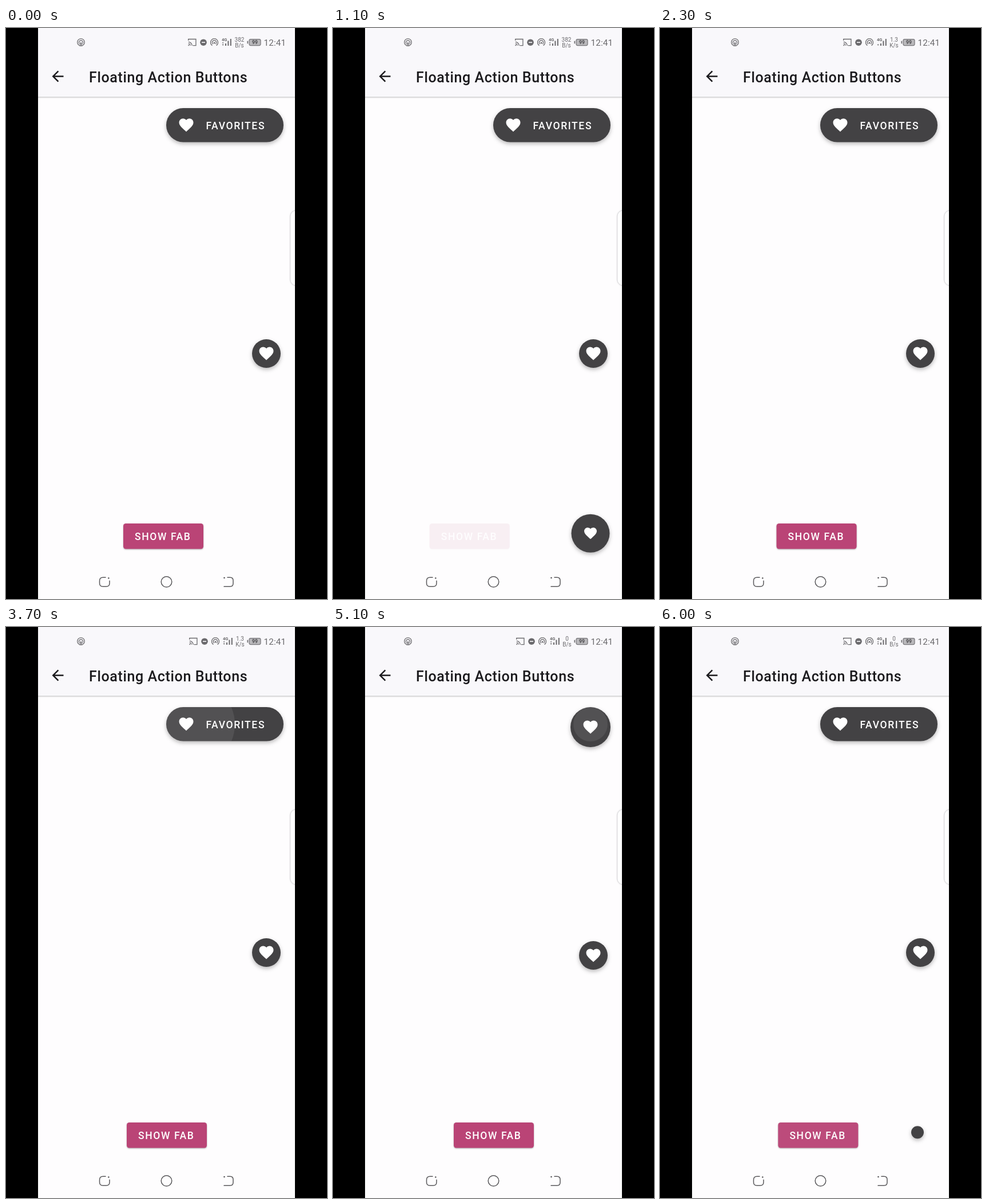
These frames come from a looping animation (561 px wide and 998 px high, 6100 ms). An HTML page:

```html
<!DOCTYPE html>
<html lang="en">
<head>
<meta charset="utf-8">
<title>Floating Action Buttons</title>
<style>
html, body { margin: 0; width: 100%; height: 100%; overflow: hidden; background: #000; }
svg { display: block; }
text { font-family: Roboto, Arial, sans-serif; }
.label { font-size: 17.5px; font-weight: 500; letter-spacing: 1.62px; fill: #fff; }
.bar { fill: #f9f8fb; filter: drop-shadow(0 1px 1.2px rgba(0,0,0,.28)); }
.raised { filter: drop-shadow(0 3px 3.5px rgba(0,0,0,.27)); }
.low { filter: drop-shadow(0 1.5px 1.3px rgba(0,0,0,.3)); }
.dark { fill: #434244; }
.line { fill: none; stroke: #6b6a6d; stroke-width: 1.3; }
.nav { fill: none; stroke: #59585b; stroke-width: 1.5; stroke-linecap: round; }
.status { fill: #6b6a6d; }
.small { font-size: 10px; text-anchor: middle; }
</style>
</head>
<body>
<svg width="561" height="998" viewBox="0 0 561 998">
  <defs>
    <path id="heart" fill="#fff" transform="scale(1.247) translate(-12 -12.2)" d="M12 21.35l-1.45-1.32C5.4 15.36 2 12.28 2 8.5 2 5.42 4.42 3 7.5 3c1.74 0 3.41.81 4.5 2.09C13.09 3.81 14.76 3 16.5 3 19.58 3 22 5.42 22 8.5c0 3.78-3.4 6.86-8.55 11.54L12 21.35z"/>
    <rect id="pill" y="140"/>
    <clipPath id="pillClip"><use href="#pill"/></clipPath>
  </defs>

  <rect x="56" width="449" height="998" fill="#fefdfe"/>
  <rect class="bar" x="50" y="-10" width="461" height="130.3"/>
  <path fill="#1b1a1d" transform="translate(75.5 69.5) scale(1.25)" d="M20 11H7.83l5.59-5.59L12 4l-8 8 8 8 1.41-1.41L7.83 13H20v-2z"/>
  <text x="145" y="95" font-size="25" font-weight="500" letter-spacing=".63" fill="#1b1a1d">Floating Action Buttons</text>

  <!-- status bar -->
  <g class="line">
    <path d="M128 30.4a6.3 6.3 0 1 1 6 0M128.6 27.6a3.5 3.5 0 1 1 4.8 0M131 25.5l-2 5.5h4z"/>
  </g>
  <g id="icons" class="status">
    <path class="line" d="M318.7 22v-2.5h13.2v11.2h-5.4M318.7 24.3a6.4 6.4 0 0 1 6.4 6.4M318.7 27.4a3.3 3.3 0 0 1 3.3 3.3"/>
    <circle cx="319.2" cy="30.3" r="1"/>
    <circle cx="345" cy="25.2" r="5.8"/>
    <path d="M342 25.2h6" stroke="#f9f8fb" stroke-width="1.6"/>
    <path class="line" d="M360.4 30.6a6.5 6.5 0 1 1 7.2 0M361.7 28a3.6 3.6 0 1 1 4.6 0"/>
    <circle cx="364" cy="26" r="1.5"/>
    <text x="377" y="22.5" font-size="7.5" font-weight="700">4G</text>
    <path d="M383 27h2v4h-2zM387.4 22.5h2v8.500h-2zM391.800 19h2v12h-2z"/>
    <path id="up" d="M377.600 26.500l1.500-2 1.500 2z"/>
    <path id="down" d="M377.600 28.500h3l-1.500 2.500z"/>
  </g>
  <g class="status">
    <text id="rate" class="small" y="24"></text>
    <text id="unit" class="small" y="34"></text>
    <rect x="421.500" y="22.500" width="1.600" height="5" rx=".8"/>
    <rect x="425" y="19.600" width="20" height="11" rx="2.500" fill="#b9b8bb" stroke="#77767a" stroke-width="1.200"/>
    <text x="435" y="28.200" font-size="8.500" font-weight="700" text-anchor="middle" fill="#4c4b4e">99</text>
    <text x="450.500" y="31" font-size="15.300" letter-spacing=".15">12:41</text>
  </g>

  <!-- side handle -->
  <rect x="497" y="319" width="30" height="131" rx="10" fill="#fff" stroke="#dedde0" stroke-width="1" class="low" style="filter:drop-shadow(0 0 1px rgba(0,0,0,.2))"/>

  <!-- extended button -->
  <g class="raised"><use href="#pill" class="dark"/></g>
  <g clip-path="url(#pillClip)">
    <circle id="pillRipple" cy="170" fill="#fff"/>
    <text id="pillLabel" class="label" y="176.500">FAVORITES</text>
  </g>
  <use id="pillHeart" href="#heart"/>

  <g id="mini">
    <circle class="dark raised" r="25"/>
    <use href="#heart"/>
  </g>

  <!-- show button and the one it reveals -->
  <g id="show">
    <rect class="low" y="866" width="140" height="44.500" rx="4.500" fill="#ba4476"/>
    <text class="label" x="20" y="895">SHOW FAB</text>
  </g>
  <g transform="translate(450 883.300)">
    <g class="raised"><circle id="fab" class="dark"/></g>
    <circle id="fabRipple" fill="#fff"/>
    <g id="fabHeart"><use href="#heart"/></g>
  </g>

  <!-- navigation bar -->
  <g class="nav">
    <path d="M174 960.300h-4.500q-6 0-6 6v4q0 6 6 6h5.500q6 0 6-6v-4"/>
    <circle cx="280.500" cy="968" r="9.300"/>
    <path d="M387 960.300h4.500q5.500 0 5.500 5.500v5q0 5.500-5.500 5.500h-10.500"/>
  </g>
  <g fill="#59585b"><circle cx="179.300" cy="961.500" r="1.300"/><circle cx="381.500" cy="961" r="1.300"/></g>

  <path d="M0 0h56v998H0zM505 0h56v998h-56z"/>
</svg>
<script>
const LOOP = 6100, STEP = 100;
const $ = id => document.getElementById(id);
const set = (id, attrs) => {
  for (const name in attrs) $(id).setAttribute(name, attrs[name]);
};

// Linear interpolation through time, value pairs; times count in steps.
function key(t, ...pairs) {
  if (t <= pairs[0]) return pairs[1];
  for (let i = 2; i < pairs.length; i += 2) {
    const [t0, v0, t1, v1] = pairs.slice(i - 2, i + 2);
    if (t <= t1) return v0 + (v1 - v0) * (t - t0) / (t1 - t0);
  }
  return pairs[pairs.length - 1];
}

// Ripple opacity for a tap at the given time.
const ripple = (t, tap) =>
  key(t, tap - 1, 0, tap, .08, tap + 1, .31, tap + 2, .31, tap + 3, .14, tap + 4, 0);

function drawStatus(t) {
  const moved = t >= 15;
  const [rate, unit] = t < 15 ? ["382", "B/s"] : t < 45 ? ["1.3", "K/s"] : ["0", "B/s"];
  $("rate").textContent = rate;
  $("unit").textContent = unit;
  set("rate", { x: moved ? 409 : 408 });
  set("unit", { x: moved ? 409 : 408 });
  set("icons", { transform: `translate(${moved ? 2 : 0} 0)` });
  set("up", { opacity: t >= 19 && t < 29 ? 0 : 1 });
}

function drawPill(t) {
  const p = key(t, 37, 0, 39, 1, 51, 1, 53, 0);
  const x = 280 + 135 * p, height = 59.5 + 10.5 * p;
  const tap = t < 45 ? 37 : 51;
  set("pill", { x, width: 485 - x, height, rx: height / 2 });
  set("pillRipple", {
    cx: tap === 37 ? 325 : 450,
    r: key(t, tap, tap === 37 ? 75 : 30, tap + 1, 250),
    opacity: ripple(t, tap)
  });
  set("pillLabel", { x: x + 69.5, opacity: Math.max(0, 1 - 1.6 * p) });
  set("pillHeart", { transform: `translate(${x + 35} ${140 + height / 2})` });
  set("mini", { transform: `translate(455 ${569 + 5 * p})` });
}

function drawShow(t) {
  let offset = 0;
  if (t < 1) offset = 6;
  else if (t >= 8 && t < 20) offset = 4.7 * (t - 8) ** 2;
  else if (t >= 20 && t < 25) offset = 1.85 * (25 - t) ** 2;
  else if (t >= 60) offset = 4.6;
  const opacity = key(t, 8, 1, 9, .96, 10, .55, 11, .07, 12, 0,
    19, 0, 20, .07, 21, .55, 22, .95, 23, 1, 59, 1, 60, .96);
  set("show", { transform: `translate(${211 - offset} 0)`, opacity });
}

function drawFab(t) {
  const r = key(t, 8, 0, 9, 11, 10, 27, 11, 33.5, 12, 35, 20, 35, 21, 25, 22, 9, 23, 0, 59, 0, 60, 11);
  const heart = key(t, 9, 0, 10, .5, 11, .88, 12, 1, 20, 1, 21, .6, 22, 0);
  set("fab", { r });
  set("fabRipple", { r: r * key(t, 19, .8, 20, 1), opacity: ripple(t, 19) });
  set("fabHeart", { transform: `scale(${heart})` });
}

function frame(now) {
  const t = Math.floor((now - start) % LOOP / STEP);
  drawStatus(t);
  drawPill(t);
  drawShow(t);
  drawFab(t);
  requestAnimationFrame(() => frame(performance.now()));
}

const start = performance.now();
frame(start);
</script>
</body>
</html>
```
